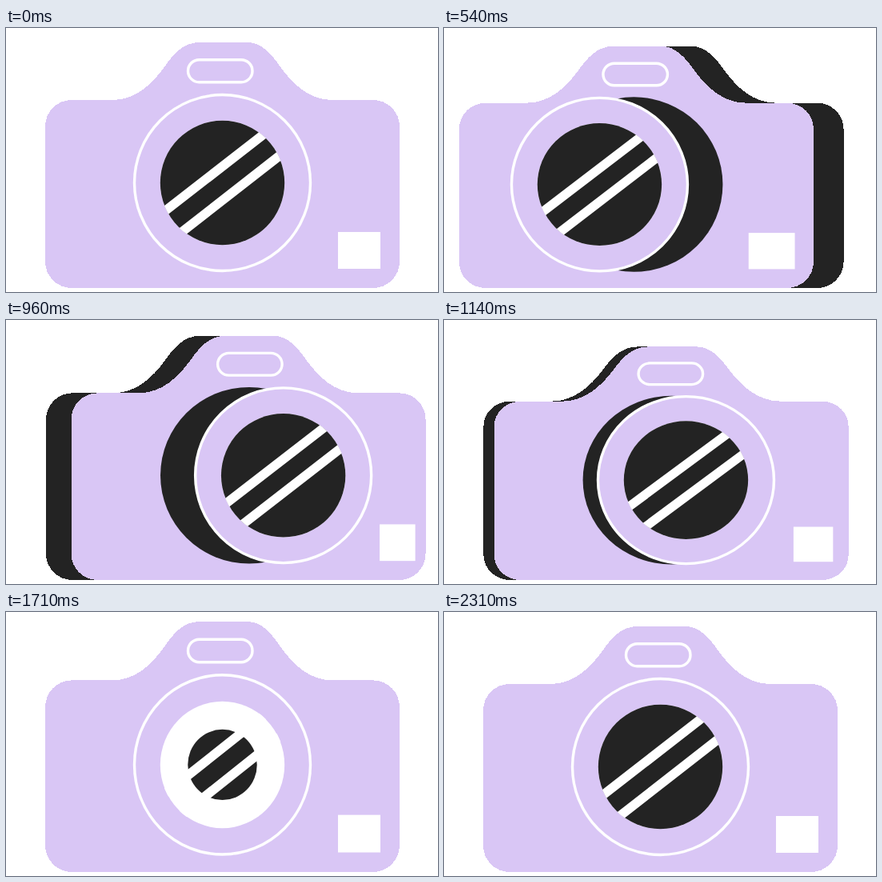
An HTML page that plays this animation: 540 px wide and 330 px high, repeating every 2.34 s.

```html
<!DOCTYPE html>
<html lang="en">
<head>
<meta charset="utf-8">
<title>Camera</title>
<style>
  html, body { margin: 0; width: 100%; height: 100%; overflow: hidden; background: #fff; }
  svg { display: block; width: 540px; height: 330px; }
  .ink { fill: #232323; }
  .skin { fill: #d9c6f5; }
  .line { fill: none; stroke: #fff; stroke-width: 3.4; }
  .white { fill: #fff; }
  #body { shape-rendering: crispEdges; }
</style>
</head>
<body>
<svg viewBox="0 0 540 330">
  <defs>
    <path id="body" d="M82 90H133C163 90 183 69 197 50C209 33 221 18 242 18H302
      C320 18 332 33 344 50C358 69 378 90 408 90H459A33 33 0 0 1 492 123V292
      A33 33 0 0 1 459 325H82A33 33 0 0 1 49 292V123A33 33 0 0 1 82 90Z"/>
    <clipPath id="glass"><circle cx="270.5" cy="193.5" r="78"/></clipPath>
  </defs>
  <g id="camera">
    <use id="back" href="#body" class="ink"/>
    <use id="front" href="#body" class="skin"/>
    <rect id="finder" class="line" x="227.5" y="39.7" width="80.5" height="28" rx="14"/>
    <rect id="label" class="white" y="255" height="46"/>
    <circle id="barrel" class="ink" cx="270.5" cy="193.5" r="111"/>
    <g id="lens">
      <circle class="skin" cx="270.5" cy="193.5" r="111"/>
      <circle class="line" cx="270.5" cy="193.5" r="110"/>
      <circle class="white" cx="270.5" cy="193.5" r="77.7"/>
      <circle id="iris" class="ink" cx="270.5" cy="193.5"/>
      <path class="line" clip-path="url(#glass)" style="stroke-width:11.5"
        d="M185 239.5L340 119M205 266.5L360 145.5"/>
    </g>
  </g>
</svg>
<script>
const LOOP = 2340, STEP = 30, FLOOR = 325;
const el = id => document.getElementById(id);
const [camera, back, front, finder, label, barrel, lens, iris] =
  ['camera', 'back', 'front', 'finder', 'label', 'barrel', 'lens', 'iris'].map(el);

// cubic-bezier(x1, 0, x2, 1)
const bezier = (x1, x2) => x => {
  let lo = 0, hi = 1, t = x;
  for (let i = 0; i < 24; i++) {
    const u = 1 - t;
    if (3 * u * u * t * x1 + 3 * u * t * t * x2 + t ** 3 < x) lo = t; else hi = t;
    t = (lo + hi) / 2;
  }
  return t * t * (3 - 2 * t);
};
const swing = bezier(.55, .35);
const smooth = u => u * u * (3 - 2 * u);

// [time, value] steps
const turn = [[0, 0], [20, 0], [460, -33], [912, 33], [1370, 0]];
const squash = [[0, 1], [228, .95], [455, 1], [682, .95], [912, 1], [1140, .95],
  [1370, 1], [1530, .95], [1720, 1.02], [1880, 1]];
const shutter = [[0, 1], [222, 0], [440, 1], [1370, 1], [1582, 0], [1820, 1]];

function at(track, t, ease) {
  const i = track.findIndex(k => k[0] > t);
  if (i < 0) return track[track.length - 1][1];
  const [t0, a] = track[i - 1], [t1, b] = track[i];
  return a + (b - a) * ease((t - t0) / (t1 - t0));
}

const slide = (node, x) => node.setAttribute('transform', `translate(${x.toFixed(2)} 0)`);

function draw(t) {
  const s = at(turn, t, swing);
  const k = at(squash, t, smooth);
  const side = (left, right) => s * (s < 0 ? left : right);

  camera.setAttribute('transform', `translate(0 ${FLOOR * (1 - k)}) scale(1 ${k})`);
  slide(back, side(-.25, .03));
  slide(front, s);
  slide(finder, side(.95, 1.14));
  slide(barrel, side(1.1, 1.03));
  slide(lens, side(2.53, 2.34));
  const x0 = 415 + side(1.14, 1.6), x1 = 468 + side(.98, 1.34);
  label.setAttribute('x', x0);
  label.setAttribute('width', x1 - x0);
  iris.setAttribute('r', 77.7 * at(shutter, t, smooth));
}

function tick() {
  const t = performance.now() % LOOP;
  draw(Math.floor(t / STEP) * STEP);
  requestAnimationFrame(tick);
}
draw(0);
requestAnimationFrame(tick);
</script>
</body>
</html>
```
